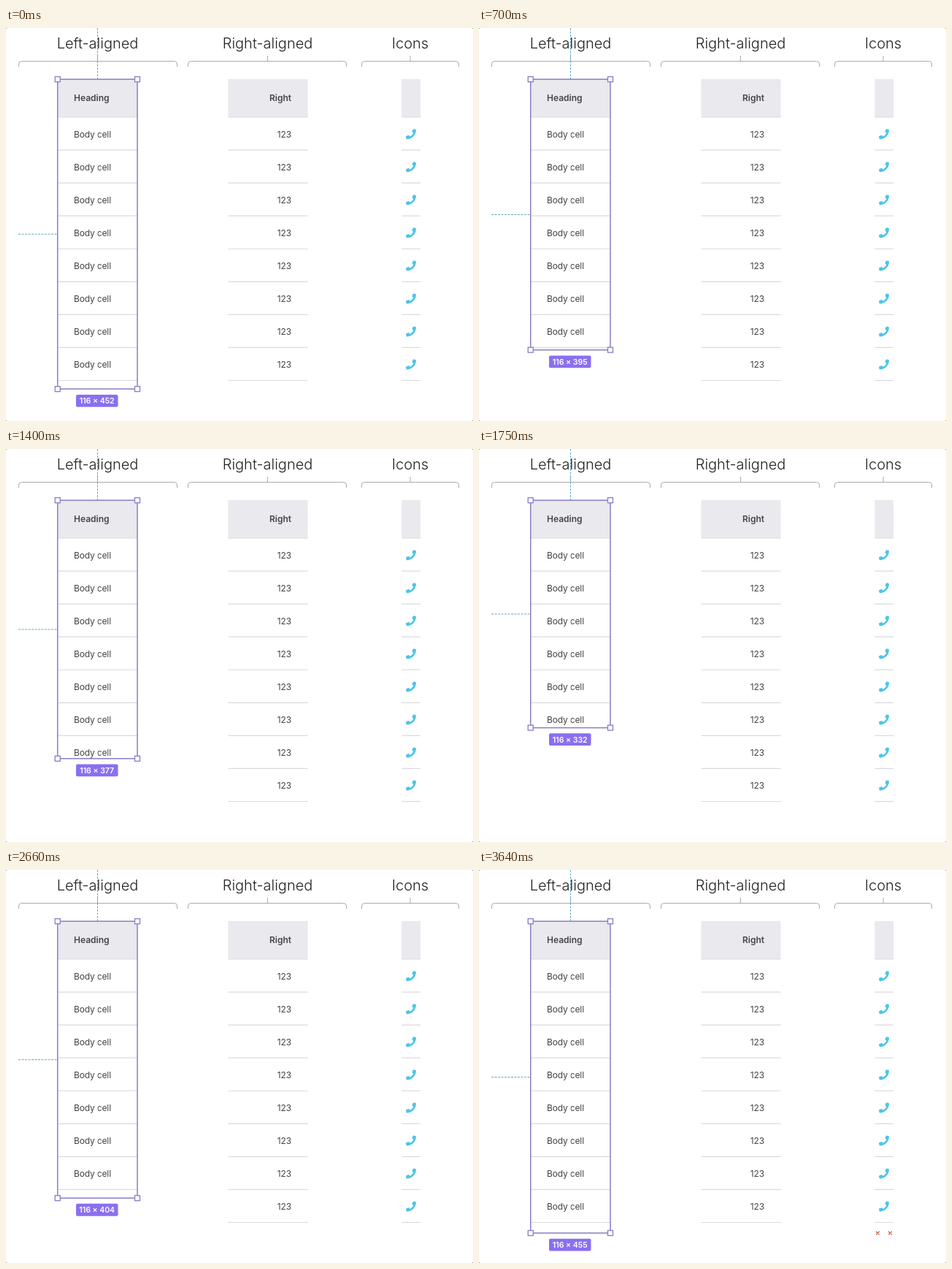
Write an HTML page that moves like this. It is 640 px wide and 538 px high and loops after 3.71 s.

```html
<!DOCTYPE html>
<html lang="en">
<head>
<meta charset="utf-8">
<title>Column resize</title>
<style>
  html, body { margin: 0; width: 100%; height: 100%; overflow: hidden; background: #777; }
  svg { display: block; width: 640px; height: 538px; background: #fff; border-radius: 2px; }
  text { font-family: Inter, "Open Sans", sans-serif; }
  .title { font-size: 20px; font-weight: 300; fill: #222; text-anchor: middle; }
  .head { font-size: 12px; font-weight: 600; fill: #44444b; }
  .cell { font-size: 12px; fill: #444; letter-spacing: -.15px; }
  .right { text-anchor: end; }
  .bracket { fill: none; stroke: #a9a9a9; }
  .rule { stroke: #dadade; stroke-width: 1.2; }
  .guide { stroke: #62a9b8; stroke-dasharray: 3 1.5; }
  .frame { fill: none; stroke: #8b7cc6; stroke-width: 1.5; }
  .handle { fill: #fff; stroke: #8b7cc6; stroke-width: 1.3; }
  .size { font-size: 10.5px; font-weight: 600; fill: #fff; text-anchor: middle; }
  .mark { fill: none; stroke: #c4674f; stroke-width: 1.3; }
</style>
</head>
<body>
<svg id="stage" viewBox="0 0 640 538"></svg>
<script>
const NS = 'http://www.w3.org/2000/svg';
const stage = document.getElementById('stage');
const LOOP = 3710, TOP = 70.2, SCALE = .938, LEFT = 70.7, RIGHT = 180;

function add(parent, tag, attrs, text) {
  const node = document.createElementNS(NS, tag);
  for (const key in attrs) node.setAttribute(key, attrs[key]);
  if (text) node.textContent = text;
  return parent.appendChild(node);
}
const set = (node, attrs) => {
  for (const key in attrs) node.setAttribute(key, attrs[key]);
};
const line = (parent, x1, y1, x2, y2, cls) =>
  add(parent, 'line', { x1, y1, x2, y2, class: cls });

function title(text, x1, x2, mid) {
  add(stage, 'text', { x: mid, y: 28, class: 'title' }, text);
  add(stage, 'path', {
    class: 'bracket',
    d: `M${x1} 53V49Q${x1} 45.5 ${x1 + 4} 45.5H${x2 - 4}Q${x2} 45.5 ${x2} 49V53M${mid} 38V45.5`
  });
}

function column(parent, x1, x2, drawCell) {
  add(parent, 'rect', { x: x1, y: 70, width: x2 - x1, height: 52, fill: '#e9e9ee' });
  for (let i = 0; i < 9; i++) {
    const y = 122 + 45.06 * i;
    line(parent, x1, y, x2, y, 'rule');
    if (i < 8) drawCell(145.2 + 45.05 * i);
  }
}

title('Left-aligned', 17.5, 234.5, 125.5);
title('Right-aligned', 249.5, 466.5, 358.5);
title('Icons', 487.5, 620.5, 554);

const clip = add(add(stage, 'clipPath', { id: 'crop' }), 'rect', { x: 60, y: 60, width: 130 });
const left = add(stage, 'g', { 'clip-path': 'url(#crop)' });
column(left, LEFT, RIGHT, y => {
  add(left, 'text', { x: 93, y: y + 4.6, class: 'cell' }, 'Body cell');
  add(left, 'rect', { x: 125, y: y - 8, width: 1, height: 16, fill: '#fff', opacity: .5 });
});
add(left, 'text', { x: 93, y: 100.4, class: 'head' }, 'Heading');

column(stage, 304.5, 413.5, y =>
  add(stage, 'text', { x: 391, y: y + 4.6, class: 'cell right' }, '123'));
add(stage, 'text', { x: 391, y: 100.4, class: 'head right' }, 'Right');

const PHONE = 'M13.5.7L10.6 0Q10 0 9.8.4L8.5 3.5Q8.4 4 8.8 4.3L10.4 5.6Q8.8 8.9 5.6 10.4L4.3 8.8' +
  'Q4 8.4 3.5 8.6L.4 9.9Q-.1 10.2 0 10.7L.7 13.5Q.8 14 1.3 14C8.3 14 14 8.3 14 1.3Q14 .8 13.5.7Z';
column(stage, 542.3, 568, y =>
  add(stage, 'path', { d: PHONE, fill: '#4cc5e8', transform: `translate(548 ${y - 7})` }));

// Selection overlay
line(stage, 125.5, 0, 125.5, 70, 'guide');
const sideGuide = line(stage, 17, 0, 70, 0, 'guide');
const frame = add(stage, 'rect', { x: LEFT, y: TOP, width: RIGHT - LEFT, class: 'frame' });
const handle = x => add(stage, 'rect', { x: x - 3.5, y: TOP - 3.5, width: 7, height: 7, class: 'handle' });
[LEFT, RIGHT].forEach(handle);
const feet = [LEFT, RIGHT].map(handle);
const badge = add(stage, 'g', {});
add(badge, 'rect', { x: 96, y: 7.7, width: 57.5, height: 16.8, rx: 2, fill: '#8a6ff0' });
const size = add(badge, 'text', { x: 124.7, y: 19.9, class: 'size' });
const marks = add(stage, 'path', { class: 'mark' });

const SNAP = {
  text: [93.5, 157, 327, 391],
  icon: [546.5, 563.5],
  edge: [304.5, 413.5, 542.3, 568]
};

// start, heights at 70 ms each; the last one holds until the next run
const RUNS = [
  [0, 452, 446, 434],
  [420, 405, 400, 398, 396, 395],
  [840, 391.5, 382, 370, 360, 364, 371, 379, 386, 377, 366, 355, 344, 337, 332],
  [1890, 335, 337, 336, 333, 331, 329, 334, 343.6, 358, 375, 391.5, 404],
  [2800, 412, 421, 430, 438, 445, 450, 454],
  [3570, 455, 455]
];
const SNAPS = { 405: 'text', 391.5: 'edge', 343.6: 'edge', 329: 'icon', 455: 'icon' };

function heightAt(t) {
  const [start, ...heights] = RUNS.findLast(run => run[0] <= t);
  return heights[Math.min(Math.floor((t - start) / 70), heights.length - 1)];
}

function draw(h) {
  const bottom = TOP + h * SCALE, mid = (TOP + bottom) / 2;
  set(clip, { height: bottom - 60 });
  set(frame, { height: bottom - TOP });
  set(sideGuide, { y1: mid, y2: mid });
  feet.forEach(foot => set(foot, { y: bottom - 3.5 }));
  set(badge, { transform: `translate(0 ${bottom})` });
  size.textContent = `116 × ${Math.round(h)}`;
  const xs = SNAP[SNAPS[h]] || [];
  set(marks, {
    d: xs.map(x => `M${x - 2.3} ${bottom - 2.3}l4.6 4.6m0-4.6l-4.6 4.6`).join('')
  });
}

const origin = performance.now();
function tick() {
  draw(heightAt((performance.now() - origin) % LOOP));
  requestAnimationFrame(tick);
}
tick();
</script>
</body>
</html>
```
